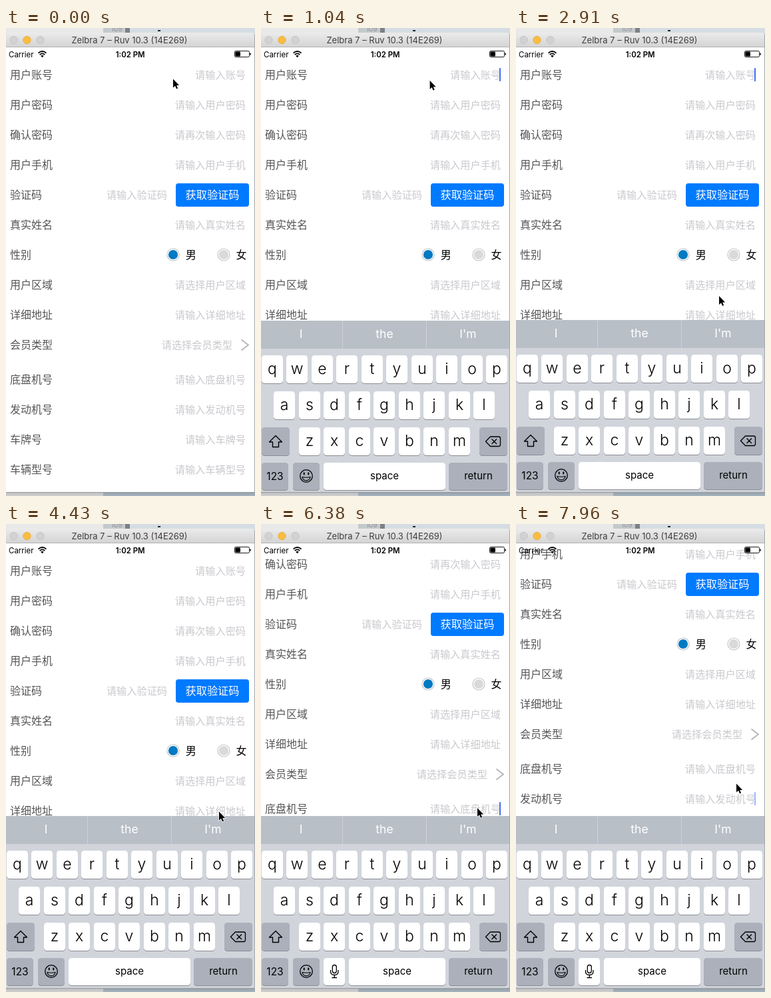
These frames come from a looping animation (374x702 px, 8 s). An HTML page:

```html
<!DOCTYPE html>
<html lang="zh-CN">
<head>
<meta charset="utf-8">
<title>Form</title>
<style>
html, body { margin: 0; width: 100%; height: 100%; overflow: hidden; background: #fff; }
svg { display: block; width: 374px; height: 702px; font-family: Inter, "Open Sans", sans-serif; }
.zh { font-family: "Noto Sans CJK SC", "Noto Sans CJK", sans-serif; font-weight: 300; }
</style>
</head>
<body>
<svg id="stage" viewBox="0 0 374 702" xmlns="http://www.w3.org/2000/svg"></svg>
<script>
const LOOP = 8000;
const ROWS = [
  ['用户账号', 70, '请输入账号'],
  ['用户密码', 115, '请输入用户密码'],
  ['确认密码', 160, '请再次输入密码'],
  ['用户手机', 205, '请输入用户手机'],
  ['验证码', 250, '请输入验证码', 242],
  ['真实姓名', 295, '请输入真实姓名'],
  ['性别', 340, ''],
  ['用户区域', 385, '请选择用户区域'],
  ['详细地址', 430, '请输入详细地址'],
  ['会员类型', 475, '请选择会员类型', 340],
  ['底盘机号', 527, '请输入底盘机号'],
  ['发动机号', 572, '请输入发动机号'],
  ['车牌号', 617, '请输入车牌号'],
  ['车辆型号', 662, '请输入车辆型号']
];

// [time, x, y] of the pointer tip
const POINTER = [
  [0, 250.5, 76], [900, 250.5, 76], [1040, 253, 77.5], [1440, 304, 404],
  [1500, 304, 404], [1730, 304.5, 401.5], [2910, 304.5, 401.5], [3310, 317, 404],
  [3960, 317, 404], [4200, 319.5, 441], [4400, 319.5, 431], [5250, 319.5, 431],
  [5600, 324.5, 425.5], [6450, 324.5, 425.5], [6800, 330, 412],
  [7900, 330, 412], [7960, 330.5, 389]
];
// [time, opacity] of the text caret
const BLINK = [
  [300, 0], [410, 1], [1150, 1], [1300, 0], [1600, 0], [1730, 1],
  [2140, 1], [2320, 0], [2620, 0], [2740, 1], [3130, 1], [3310, 0],
  [3600, 0], [3670, 1], [4100, 1], [4250, 0], [4550, 0], [4660, 1],
  [5480, 1], [5620, 0], [5950, 0], [6090, 1], [7369, 1], [7370, 0],
  [7895, 0], [8030, 1]
];
// [time, caret centre in the form]
const FOCUS = [[0, 70], [4830, 430], [6270, 527], [6950, 572]];

const text = (s, x, y, size, fill, anchor = 'start', extra = '') =>
  `<text x="${x}" y="${y}" font-size="${size}" fill="${fill}" text-anchor="${anchor}" ${extra}>${s}</text>`;
const zh = (s, x, mid, size, fill, anchor) =>
  text(s, x, mid + size * 0.37, size, fill, anchor, 'class="zh"');
const rect = (x, y, w, h, fill, r = 0, extra = '') =>
  `<rect x="${x}" y="${y}" width="${w}" height="${h}" rx="${r}" fill="${fill}" ${extra}/>`;
const circle = (x, y, r, fill, extra = '') =>
  `<circle cx="${x}" cy="${y}" r="${r}" fill="${fill}" ${extra}/>`;
const line = (d, color, w, extra = '') =>
  `<path d="${d}" fill="none" stroke="${color}" stroke-width="${w}" ${extra}/>`;
const key = (x, y, w, h = 42, fill = '#fff') =>
  rect(x, y + 1, w, h, '#898c92', 4.5) + rect(x, y, w, h, fill, 4.5);

function desktop() {
  return rect(0, 0, 374, 702, '#c3cbd2')
    + rect(0, 0, 146, 8, '#e9e9e9') + rect(146, 0, 33, 8, '#c4c9cd')
    + text('109', 158, 5, 10, '#8b9095')
    + rect(179, 0, 7, 8, '#7c8185') + rect(186, 0, 188, 8, '#d5dde3')
    + rect(228, 3, 4, 2, '#222')
    + rect(0, 695, 146, 7, 'url(#shadeL)') + rect(146, 695, 228, 7, 'url(#shadeR)');
}

function titleBar() {
  const light = (x, fill, edge) => circle(x, 18, 5.7, fill, `stroke="${edge}" stroke-width=".7"`);
  return '<path d="M0 29V11Q0 7 4 7H369Q373 7 373 11V29Z" fill="url(#bar)"/>'
    + rect(0, 28, 373, 1, '#b4b4b4')
    + light(11.5, '#d2d2d2', '#bcbcbc') + light(31.5, '#fdbc40', '#de9f34')
    + light(51.5, '#d2d2d2', '#bcbcbc')
    + text('Zelbra 7 – Ruv 10.3 (14E269)', 185.5, 23, 13, '#3e3e3e', 'middle');
}

function statusBar() {
  return text('Carrier', 4, 43.6, 11.5, '#000')
    + line('M48.5 37.6Q54.5 32.4 60.5 37.6M50.7 40Q54.5 36.8 58.3 40', '#000', 1.7)
    + '<path d="M54.5 44.2L52.2 41.7Q54.5 39.9 56.8 41.7Z"/>'
    + text('1:02 PM', 186.7, 43.6, 11.4, '#000', 'middle', 'font-weight="600"')
    + rect(343.5, 34.5, 22, 9, '#fff', 1.8, 'stroke="#000" stroke-width=".9"')
    + rect(344.4, 35.4, 7.6, 7.2, '#000', .8)
    + rect(366.4, 37.4, 1.5, 3.4, '#000', .7);
}

function form() {
  const rows = ROWS.map(([label, y, hint, end = 360]) =>
    zh(label, 6, y, 16, '#555') + zh(hint, end, y, 15.2, '#c9c9ce', 'end')).join('');
  const radio = (x, fill) =>
    circle(x, 340, 9, '#fff', 'stroke="#c4c4c6" stroke-width="1.2"') + circle(x, 340, 7.1, fill);
  return rows
    + rect(255, 233, 110, 35, '#007aff', 4)
    + zh('获取验证码', 310, 250.5, 16.2, '#fff', 'middle')
    + radio(251, '#007ac3') + zh('男', 269.8, 340, 16, '#000')
    + radio(327, '#d9d9db') + zh('女', 345.5, 340, 16, '#000')
    + line('M353.5 467.5L364 475.5L353.5 483.5', '#b2b2b6', 1.7);
}

function keyboard() {
  const letters = [['qwertyuiop', 1, 490], ['asdfghjkl', 19.5, 544], ['zxcvbnm', 57, 598]]
    .map(([row, x0, y]) => [...row].map((c, i) => {
      const x = Math.floor(x0 + i * 37.5);
      return key(x, y, 32) + text(c, x + 16, y + 28, 23, '#000', 'middle', 'font-weight="350"');
    }).join('')).join('');
  const dark = '#abb0bb';
  const words = [['I', 60], ['the', 185.5], ["I'm", 311]]
    .map(([s, x]) => text(s, x, 463.5, 17.5, '#fff', 'middle')).join('');
  const space = (id, x, w) =>
    `<g id="${id}">${key(x, 651, w, 41)}${text('space', x + w / 2, 676, 15, '#000', 'middle')}`;
  return rect(0, 438, 373, 258, '#d1d5db') + rect(0, 438, 373, 42, '#b8bfc7')
    + rect(122, 438, 1, 42, '#cdd2d8') + rect(248, 438, 1, 42, '#cdd2d8')
    + words + letters
    + key(1, 598, 42, 42, dark) + key(328, 598, 42, 42, dark)
    + line('M22 610.5L12.5 620H17.5V627.5H26.5V620H31.5Z', '#000', 1.4, 'stroke-linejoin="round"')
    + line('M344.5 612H357Q359.5 612 359.5 614.5V624Q359.5 626.5 357 626.5H344.5L337.5 619.2Z'
      + 'M346.5 615.5L354 623M354 615.5L346.5 623', '#000', 1.3, 'stroke-linejoin="round"')
    + key(1, 651, 40, 41, dark) + text('123', 21, 677, 15.5, '#000', 'middle')
    + key(48, 651, 40, 41, dark)
    + circle(68, 671, 9.3, 'none', 'stroke="#000" stroke-width="1.3"')
    + rect(63.7, 665.6, 2, 4, '#000', 1) + rect(70.3, 665.6, 2, 4, '#000', 1)
    + line('M62 672.5Q68 674 74 672.5Q73 677.8 68 677.8Q63 677.8 62 672.5Z', '#000', 1.2)
    + space('wide', 94, 183) + '</g>'
    + space('narrow', 132, 145) + key(94, 651, 32, 41)
    + rect(107.3, 661.5, 6, 12, 'none', 3, 'stroke="#000" stroke-width="1.3"')
    + line('M104.5 669V671Q104.5 676.5 110.3 676.5Q116 676.5 116 671V669M110.3 676.5V680.5M106.5 680.5H114',
      '#000', 1.3) + '</g>'
    + key(282, 651, 88, 41, dark) + text('return', 326.5, 676, 15, '#000', 'middle');
}

const grad = (id, from, to) =>
  `<linearGradient id="${id}" x2="0" y2="1"><stop stop-color="${from}"/><stop offset="1" stop-color="${to}"/></linearGradient>`;

document.getElementById('stage').innerHTML =
  `<defs>${grad('bar', '#ebebeb', '#d3d3d3')}${grad('shadeL', '#b8b8b8', '#d0d0d0')}${grad('shadeR', '#8f9ba5', '#a6b4bf')}
  <clipPath id="screen"><rect y="29" width="373" height="667"/></clipPath></defs>
  ${desktop()}
  ${rect(0, 28, 373, 668, '#fff')}
  <g clip-path="url(#screen)">
    <g id="form">${form()}${rect(358, 0, 2, 20, '#426bf2', .8, 'id="caret"')}</g>
    ${statusBar()}
    <g id="keys">${keyboard()}</g>
  </g>
  ${titleBar()}
  ${rect(373, 10, 1, 686, '#a3a7ab')}${rect(0, 696, 374, 1, '#999da1')}
  <path id="pointer" d="M.5 .5V13.5L3.5 10.8L5.5 15.3L7.6 14.4L5.7 10H9.6Z" stroke="#fff" stroke-width="1.4" paint-order="stroke"/>`;

const [formEl, caret, keys, wide, narrow, pointer] =
  ['form', 'caret', 'keys', 'wide', 'narrow', 'pointer'].map(id => document.getElementById(id));

// Linear interpolation over rows of [time, ...values]
function track(table, t) {
  const i = table.findIndex(row => row[0] > t);
  if (i === 0) return table[0].slice(1);
  if (i < 0) return table[table.length - 1].slice(1);
  const a = table[i - 1], b = table[i], k = (t - a[0]) / (b[0] - a[0]);
  return a.slice(1).map((v, n) => v + (b[n + 1] - v) * k);
}

// cubic-bezier(.38, .7, .125, 1), solved by bisection
function ease(p) {
  if (p <= 0) return 0;
  if (p >= 1) return 1;
  const curve = (a, b, s) => 3 * a * s * (1 - s) ** 2 + 3 * b * s * s * (1 - s) + s ** 3;
  let lo = 0, hi = 1;
  for (let i = 0; i < 20; i++) {
    const mid = (lo + hi) / 2;
    if (curve(.38, .125, mid) < p) lo = mid; else hi = mid;
  }
  return curve(.7, 1, lo);
}
const ramp = (t, start, length) => ease((t - start) / length);
const halfPixel = v => Math.round(v * 2) / 2;
const move = (el, x, y) => el.setAttribute('transform', `translate(${x} ${y})`);

function draw(t) {
  move(formEl, 0, -halfPixel(100 * ramp(t, 4800, 440) + 60 * ramp(t, 6430, 440)));
  move(keys, 0, Math.round(258 * (1 - ramp(t, 630, 480))));
  move(pointer, ...track(POINTER, t));
  const row = FOCUS.filter(f => f[0] <= t).pop()[1];
  caret.setAttribute('y', row - 10);
  caret.setAttribute('opacity', track(BLINK, t)[0]);
  const mic = t >= 4830;
  wide.setAttribute('display', mic ? 'none' : 'inline');
  narrow.setAttribute('display', mic ? 'inline' : 'none');
}

function tick() {
  draw(performance.now() % LOOP);
  requestAnimationFrame(tick);
}
tick();
</script>
</body>
</html>
```
